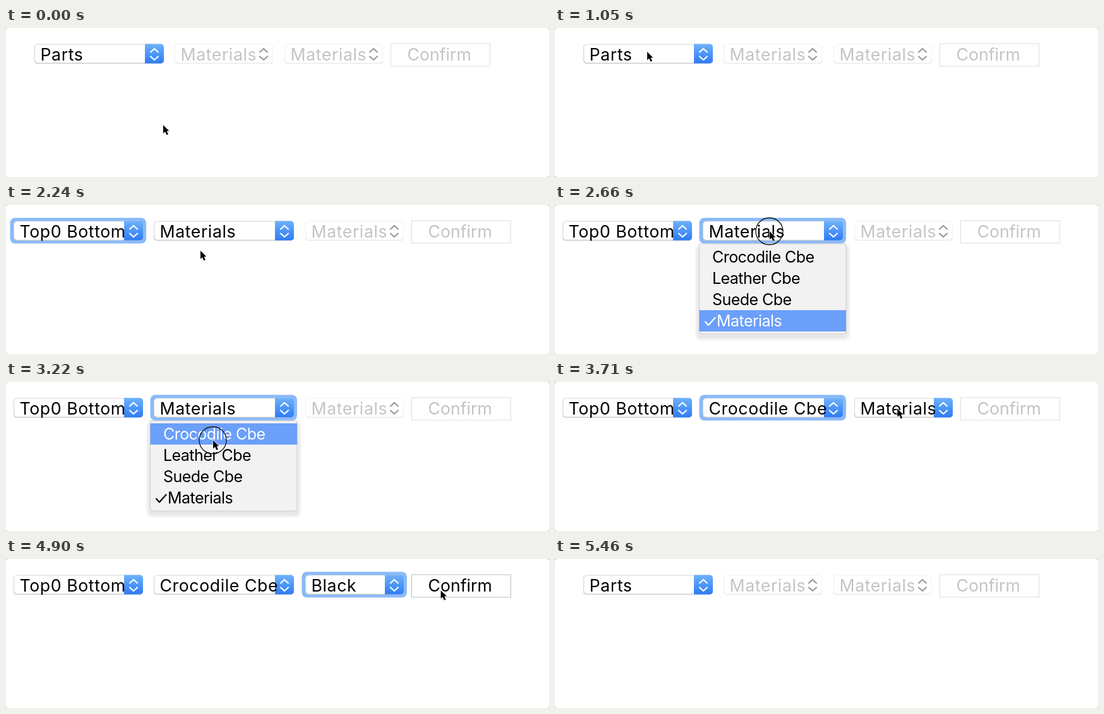
An HTML page that plays this animation: 860x238 px, repeating every 5810 ms.

```html
<!DOCTYPE html>
<html lang="en">
<head>
<meta charset="utf-8">
<title>Linked selects</title>
<style>
  html, body { margin: 0; width: 100%; height: 100%; overflow: hidden; background: #fff; }
  svg { display: block; width: 860px; height: 238px; }
  text { font: 400 26.67px Inter, "Open Sans", sans-serif; white-space: pre; }
  .value { letter-spacing: .6px; }
  .item { font-size: 25px; letter-spacing: -.55px; }
  .line { fill: none; stroke-width: 2.2; stroke-linecap: round; stroke-linejoin: round; }
</style>
</head>
<body>
<svg viewBox="0 0 860 238">
  <defs>
    <linearGradient id="blue" x2="0" y2="1">
      <stop stop-color="#6db2fa"/><stop offset="1" stop-color="#2f7bf5"/>
    </linearGradient>
    <filter id="soft" x="-10%" y="-10%" width="120%" height="125%">
      <feGaussianBlur stdDeviation="2"/>
    </filter>
  </defs>
  <rect width="860" height="238" fill="#777"/>
  <rect width="860" height="238" rx="2.5" fill="#fff"/>
  <g id="form"></g>
  <g id="pointer">
    <circle r="21.5" cx="-.5" fill="none" stroke="#111" stroke-width="1.3"/>
    <path d="M0 0V13.2L3 10.4L5.4 15.8L7.9 14.7L5.6 9.4H9.4Z" fill="#000"
      stroke="#fff" stroke-width="1.4" paint-order="stroke"/>
  </g>
</svg>
<script>
const LOOP = 5810, STEP = 70, HOLD = 3 * STEP;
const MIDDLE = 406, GAP = 17.5, BUTTON_GAP = 12, BUTTON_W = 158;
const TOP = 66, ROW = 34;

// Where the pointer arrives and when; a press keeps it there for HOLD.
const stops = [
  { at: 0, x: 249, y: 155 },
  { at: 1120, x: 146, y: 38, press: true },
  { at: 1960, x: 137, y: 117, press: true },
  { at: 2240, x: 308, y: 73 },
  { at: 2520, x: 340, y: 42, press: true },
  { at: 3220, x: 328, y: 93, press: true },
  { at: 3780, x: 545, y: 42, press: true },
  { at: 4340, x: 543, y: 83, press: true },
  { at: 5110, x: 716, y: 44, press: true },
  { at: 5460, x: 630, y: 260 }
];
const presses = stops.filter(s => s.press).map(s => s.at);
const done = presses[presses.length - 1] + HOLD;

const selects = [
  { pick: 1, items: ['Side', 'Top0 Bottom', 'Patch', 'Parts'] },
  { pick: 0, items: ['Crocodile Cbe', 'Leather Cbe', 'Suede Cbe', 'Materials'] },
  { pick: 0, items: ['Black', 'Chestnut', 'Materials'] }
];

// Each select takes two presses: one opens it, one picks; the next press blurs it.
selects.forEach((s, i) => {
  const [focus, pick, blur] = presses.slice(2 * i);
  Object.assign(s, { focus, blur, open: focus + STEP, close: pick + HOLD });
  s.on = i ? selects[i - 1].close : 0;
});

const form = document.getElementById('form');
const pointer = document.getElementById('pointer');
const ring = pointer.querySelector('circle');
const within = (t, a, b) => t >= a && t < b;
const ease = k => k < .5 ? 8 * k ** 4 : 1 - 8 * (1 - k) ** 4;

function pointerAt(t) {
  const i = stops.findIndex(s => s.at > t);
  if (i < 0) return stops[stops.length - 1];
  const a = stops[i - 1], b = stops[i];
  const leave = a.at + (a.press ? HOLD : 0);
  const k = ease(Math.max(0, (t - leave) / (b.at - leave)));
  return { x: a.x + (b.x - a.x) * k, y: a.y + (b.y - a.y) * k };
}

const box = (x, y, w, h, r, attrs) =>
  `<rect x="${x}" y="${y}" width="${w}" height="${h}" rx="${r}" ${attrs}/>`;

const label = (x, y, str, fill, cls = '') =>
  `<text x="${x}" y="${y}" fill="${fill}" class="${cls}">${str}</text>`;

const line = (d, color) => `<path class="line" d="${d}" stroke="${color}"/>`;

const arrows = (x, color) =>
  line(`M${x - 6} 38.5l6 -5.5l6 5.5M${x - 6} 45.5l6 5.5l6 -5.5`, color);

function control(x, w, str, enabled, focused) {
  const r = x + w;
  let out = '';
  if (focused) out += box(x - 5.5, 20.5, w + 10.5, 41, 8, 'fill="#8abaf8"');
  out += box(x, 26.5, w, 30.5, 5, `fill="${enabled ? '#bdbdbd' : '#e2e2e2'}"`);
  out += box(x + .5, 26, w - 1, 30, 5,
    `fill="#fff" stroke="${enabled ? '#d4d4d4' : '#f1f1f1'}"`);
  if (enabled) {
    out += `<path d="M${r - 30} 25.5h25a5 5 0 0 1 5 5v21a5 5 0 0 1 -5 5h-25z" fill="url(#blue)"/>`;
  }
  out += arrows(r - 15, enabled ? '#fff' : '#999');
  return out + label(x + 9.5, 52, str, enabled ? '#000' : '#c4c4c4', 'value');
}

function menu(x, w, items, y) {
  const last = items.length - 1;
  const h = items.length * ROW + 8;
  const hot = y < TOP ? last : Math.floor((y - TOP) / ROW);
  let out = box(x - 5, 64, w + 10, h + 7, 8, 'fill="#000" opacity=".09" filter="url(#soft)"');
  out += `<path d="M${x} 62h${w}v${h - 5}a5 5 0 0 1 -5 5h${10 - w}a5 5 0 0 1 -5 -5z"
    fill="#f2f2f2" stroke="#c6c6c6" stroke-width=".8"/>`;
  items.forEach((item, i) => {
    const top = TOP + i * ROW, color = i === hot ? '#fff' : '#000';
    if (i === hot) out += box(x, top, w, ROW, 0, 'fill="#6b9ffa"');
    if (i === last) out += line(`M${x + 9.5} ${top + 18.5}l5 5.5l10.5 -12`, color);
    out += label(x + (i === last ? 27.5 : 20.5), top + 26, item, color, 'item');
  });
  return out;
}

function confirmButton(x, enabled) {
  return box(x + .5, 25, BUTTON_W - 1, 36, 0,
    `fill="#fff" stroke="${enabled ? '#bbb' : '#dcdcdc'}"`) +
    label(x + 26.5, 52, 'Confirm', enabled ? '#000' : '#c4c4c4');
}

function draw(t) {
  const { x, y } = pointerAt(t);
  const after = time => t >= time && t < done;
  const widths = [205, after(selects[1].on) ? 222 : 156, 156];
  const total = widths.reduce((a, b) => a + b) + 2 * GAP + BUTTON_GAP + BUTTON_W;
  let left = MIDDLE - total / 2, html = '', popup = '';

  selects.forEach((s, i) => {
    const w = widths[i], sx = Math.floor(left);
    const str = s.items[after(s.close) ? s.pick : s.items.length - 1];
    html += control(sx, w, str, i === 0 || after(s.on), within(t, s.focus, s.blur));
    if (within(t, s.open, s.close)) popup = menu(sx - 5.5, w + 10.5, s.items, y);
    left += w + GAP;
  });
  html += confirmButton(left - GAP + BUTTON_GAP, after(selects[2].close));
  form.innerHTML = html + popup;

  pointer.setAttribute('transform', `translate(${x} ${y})`);
  ring.style.display = presses.some(p => within(t, p, p + HOLD)) ? '' : 'none';
}

const start = performance.now();
let shown = -1;

function tick() {
  const t = (performance.now() - start) % LOOP;
  const step = Math.floor(t / STEP) * STEP;
  if (step !== shown) draw(shown = step);
  requestAnimationFrame(tick);
}
tick();
</script>
</body>
</html>
```
